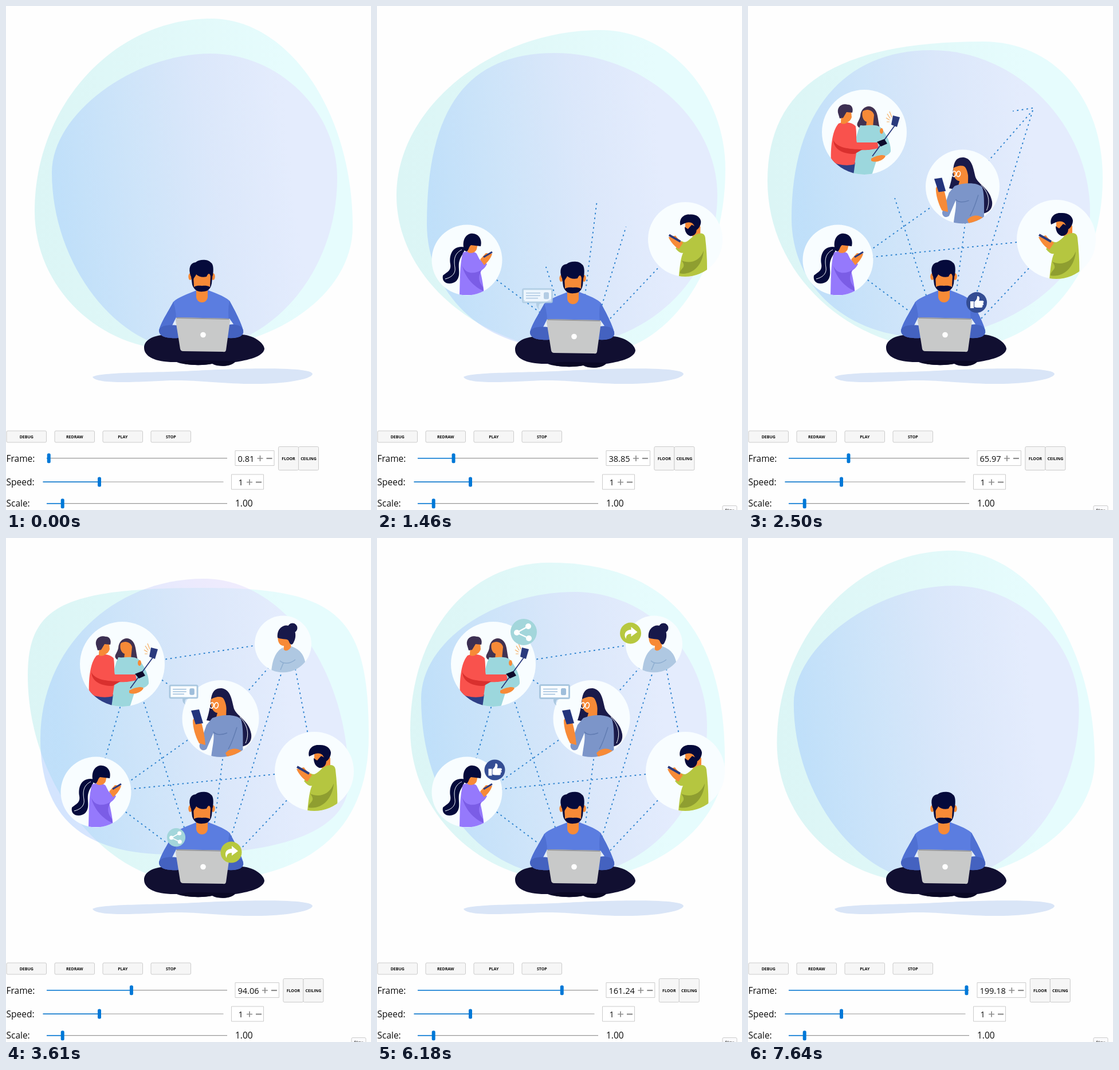
Animation, 637 px wide and 879 px high, one loop 7690 ms. Source, as an HTML page with a canvas:

```html
<!DOCTYPE html>
<html lang="en">
<head>
<meta charset="utf-8">
<title>Connected people</title>
<style>
html, body { margin: 0; width: 100%; height: 100%; overflow: hidden; background: #fefefe; }
canvas { display: block; }
</style>
</head>
<body>
<canvas id="stage" width="637" height="879"></canvas>
<script>
const ctx = document.getElementById('stage').getContext('2d');
const LOOP = 7690;
const SKIN = '#f78a37', DARK = '#050a3b', PHONE = '#2a3a7d', BLUE = '#0078d7';
const FONT = '"Open Sans", "Noto Sans", sans-serif';

// Counter value at given times
const TIMES = [0, 1460, 2500, 3610, 4960, 6180, 7640];
const COUNTS = [0.81, 38.85, 65.97, 94.06, 129.24, 161.24, 199.18];

// Blob poses: left, top, right, bottom node, then the fullness of each corner
const OUTER = [
  [50, 358, 358, 22, 605, 385, 300, 600, 0.55, 0.55, 0.55, 0.55],
  [34, 330, 390, 42, 608, 285, 380, 606, 0.53, 0.55, 0.55, 0.55],
  [34, 305, 410, 62, 619, 300, 350, 600, 0.68, 0.59, 0.58, 0.55],
  [38, 240, 350, 87, 633, 345, 320, 600, 0.8, 0.81, 0.66, 0.52],
  [53, 300, 245, 63, 615, 350, 330, 598, 0.62, 0.75, 0.58, 0.56],
  [58, 335, 300, 43, 607, 385, 330, 598, 0.58, 0.66, 0.55, 0.55]
];
const INNER = [
  [80, 290, 357, 83, 578, 300, 320, 600, 0.49, 0.54, 0.55, 0.52],
  [87, 380, 310, 82, 594, 330, 310, 595, 0.68, 0.54, 0.56, 0.56],
  [76, 370, 320, 77, 597, 360, 310, 578, 0.63, 0.54, 0.5, 0.58],
  [60, 350, 345, 71, 598, 425, 290, 552, 0.56, 0.55, 0.65, 0.68],
  [71, 335, 345, 85, 600, 390, 320, 562, 0.58, 0.55, 0.57, 0.68],
  [77, 280, 345, 94, 576, 330, 330, 590, 0.53, 0.55, 0.55, 0.58]
];

const clamp = x => Math.max(0, Math.min(1, x));
const span = (f, a, b) => clamp((f - a) / (b - a));
const easeOut = p => 1 - (1 - p) ** 3;
const leave = f => 1 - span(f, 184, 197) ** 2;

function fill(color, d) {
  ctx.fillStyle = color;
  ctx.fill(new Path2D(d));
}
function stroke(color, width, d) {
  ctx.strokeStyle = color;
  ctx.lineWidth = width;
  ctx.stroke(new Path2D(d));
}
function oval(color, x, y, rx, ry = rx) {
  ctx.fillStyle = color;
  ctx.beginPath();
  ctx.ellipse(x, y, rx, ry, 0, 0, 7);
  ctx.fill();
}
function scaled(x, y, s, draw) {
  ctx.save();
  ctx.translate(x, y);
  ctx.scale(s, s);
  draw();
  ctx.restore();
}

// ---- background ----
// Smooth cyclic interpolation of a list of poses
function poseAt(keys, f) {
  const n = keys.length;
  const time = i => 200 * Math.floor(i / n) + COUNTS[(i + n) % n];
  let i = n - 1;
  while (i > 0 && f < COUNTS[i]) i--;
  const h = time(i + 1) - time(i);
  const p = clamp((f - time(i)) / h), q = 1 - p;
  return keys[i].map((_, k) => {
    const at = j => keys[(j + n) % n][k];
    const slope = j => (at(j + 1) - at(j - 1)) / (time(j + 1) - time(j - 1));
    return at(i) * (1 + 2 * p) * q * q + slope(i) * h * p * q * q
      + at(i + 1) * p * p * (3 - 2 * p) - slope(i + 1) * h * p * p * q;
  });
}
function blob(keys, f, color) {
  const [lx, ly, tx, ty, rx, ry, bx, by, a, b, c, d] = poseAt(keys, f);
  ctx.beginPath();
  ctx.moveTo(lx, ly);
  ctx.bezierCurveTo(lx, ly + (ty - ly) * a, tx + (lx - tx) * a, ty, tx, ty);
  ctx.bezierCurveTo(tx + (rx - tx) * b, ty, rx, ry + (ty - ry) * b, rx, ry);
  ctx.bezierCurveTo(rx, ry + (by - ry) * c, bx + (rx - bx) * c, by, bx, by);
  ctx.bezierCurveTo(bx + (lx - bx) * d, by, lx, ly + (by - ly) * d, lx, ly);
  ctx.fillStyle = color;
  ctx.fill();
}
function gradient(x0, y0, x1, y1, ...colors) {
  const g = ctx.createLinearGradient(x0, y0, x1, y1);
  colors.forEach((c, i) => g.addColorStop(i / (colors.length - 1), c));
  return g;
}
const outerFill = gradient(40, 330, 500, 300, '#dbf5f5', '#e0f8f8', '#e6fcfd');
const innerFill = gradient(95, 365, 500, 305, '#95beff66', '#b3c7fc66', '#d0ccfb66', '#e1d4fd66');

// ---- dotted links: x0, y0, x1, y1, start, end ----
const LINKS = [
  [285, 535, 157, 439, 8, 22], [407, 545, 538, 407, 14, 32],
  [363, 505, 387, 315, 15, 42.3], [390, 530, 497, 182, 20, 65.2],
  [311, 505, 219, 220, 27.5, 92], [157, 466, 374, 312, 40, 55],
  [157, 444, 538, 405, 42, 62], [374, 322, 497, 182, 48, 66],
  [497, 178, 203, 223, 63, 88], [203, 200, 374, 318, 72, 90],
  [497, 187, 538, 400, 70, 88], [218, 230, 157, 440, 72, 90]
];
function links(f) {
  ctx.save();
  ctx.globalAlpha = 1 - span(f, 184, 192);
  ctx.setLineDash([2.8, 5.6]);
  for (const [x0, y0, x1, y1, a, b] of LINKS) {
    const p = span(f, a, b);
    if (p) stroke('#2c82cf', 1.9, `M${x0} ${y0}L${x0 + (x1 - x0) * p} ${y0 + (y1 - y0) * p}`);
  }
  ctx.restore();
}

// ---- people in circles ----
function girl() {
  fill(DARK, 'M154 421C134 416 125 432 128 450C130 462 122 464 115 470C112 484 128 488 138 480C148 470 140 456 144 444C147 434 152 432 154 421Z');
  stroke('#f4fbff', 1, 'M148 425C134 432 134 444 136 456C138 468 128 474 119 476');
  fill('#9579fc', 'M150 430C160 426 170 428 174 432C178 440 180 446 183 443L192 450C188 458 184 460 180 462C184 478 186 490 187 504L144 504C145 480 144 450 150 430Z');
  fill('#7b5de6', 'M149 453C155 468 170 468 183 460C178 468 175 478 185 490L186 497C168 490 152 470 149 453Z');
  fill(SKIN, 'M158 414L158 429C164 433 172 430 174 424L176 414Z');
  fill(DARK, 'M151 420C149 405 158 395 168 397C178 398 184 408 181 419L164 417C160 420 160 426 157 428C152 428 151 424 151 420Z');
  fill(SKIN, 'M180 442L190 431L201 432C199 440 192 448 187 452Z');
  stroke(PHONE, 3, 'M186 438L201 429');
}
function reader() {
  fill(SKIN, 'M538 374L560 374L566 384L566 402C556 408 540 396 538 388Z');
  fill('#b5c640', 'M554 400C564 394 574 394 575 404C578 430 579 455 578 477L526 477C528 455 530 440 534 432C528 434 522 426 520 424L531 410C540 416 545 407 554 400Z');
  fill('#8f9e30', 'M572 428C564 450 544 452 531 446C542 460 528 460 528 470C550 474 570 456 572 428Z');
  fill(SKIN, 'M507 403L520 400C524 406 530 411 534 413L526 425C518 420 511 412 507 403Z');
  stroke(PHONE, 4, 'M508 399L529 411');
  fill(DARK, 'M537 384L543 388L550 380L558 384C561 394 556 401 547 401C540 398 537 392 537 384Z');
  fill(DARK, 'M529 381C526 370 534 360 546 361C558 360 566 366 567 374C567 382 562 388 558 390L556 384L552 378C544 372 536 378 529 381Z');
}
function couple() {
  fill('#413251', 'M196 192C197 176 212 170 221 180C228 188 226 202 231 216L194 212C186 206 194 202 196 192Z');
  fill(SKIN, 'M200 184C208 178 218 182 220 190L218 210L206 210L207 202C201 200 198 192 200 184Z');
  fill('#9cd7dd', 'M196 208C206 210 222 204 232 212C240 222 250 238 249 254C245 262 232 264 226 264L216 295L182 295C182 262 186 230 196 208Z');
  oval(SKIN, 233, 218, 3, 5);
  fill(SKIN, 'M215 266C225 260 238 258 240 262C236 270 222 274 215 270Z');
  fill('#2e3f86', 'M146 268L187 273L184 295L160 295Z');
  fill('#f9524d', 'M158 205C170 200 184 204 188 210C190 225 188 232 190 238L226 238L228 248C210 252 200 252 190 250L186 276C170 280 156 276 145 272C144 250 146 218 158 205Z');
  fill('#d9302e', 'M149 234C155 247 175 250 200 250L186 258C165 258 150 250 149 234Z');
  fill(SKIN, 'M163 183L180 183L181 194C178 202 174 202 172 204C168 206 164 206 162 204Z');
  fill('#3c2f52', 'M157 186C155 174 166 169 174 172C182 172 184 180 182 186L172 185L166 195L160 196Z');
  stroke(PHONE, 1.8, 'M217 262L258 206');
  fill('#0d0b2c', 'M225 237L238 232L243 240L232 245Z');
  fill(PHONE, 'M253 191L265 194L260 211L250 207Z');
  stroke('#f6ad62', 1.2, 'M251 194L247 184M248 196L243 188M247 199L241 195M247 202L242 202');
}
function glasses() {
  fill('#1a1a49', 'M350 318C356 300 356 290 358 280C360 266 366 262 376 262C392 264 394 282 398 298C404 312 424 318 428 342C430 358 418 364 408 364L372 322Z');
  stroke('#f4fbff', 1, 'M408 312C420 324 426 340 418 358');
  fill(SKIN, 'M358 281C366 274 382 276 385 286L384 316L366 316L369 305C360 304 356 292 358 281Z');
  fill('#7c95c9', 'M360 314C375 308 400 306 410 316C416 335 412 360 414 383L358 383C360 364 364 350 362 340L350 368C342 374 336 366 338 360L350 326Z');
  stroke('#617cb2', 1.5, 'M362 338C366 344 376 344 386 340M403 330C398 346 394 358 388 368');
  fill(SKIN, 'M326 318C328 310 338 316 341 322C345 335 347 350 348 361L337 358C330 345 326 330 326 318Z');
  fill(SKIN, 'M383 375C392 365 404 366 412 372L404 382L386 382Z');
  fill('#23347c', 'M323 301L337 299L344 323L331 325Z');
  fill('#1a1a49', 'M358 281C360 266 374 262 384 268C392 276 390 290 386 304C384 290 382 280 376 277C370 276 364 278 358 281Z');
  ctx.strokeStyle = '#fff';
  ctx.lineWidth = 1.6;
  for (const x of [359, 367]) {
    ctx.beginPath();
    ctx.ellipse(x, 292, 3.4, 5, 0.2, 0, 7);
    ctx.stroke();
  }
}
function bun() {
  oval('#17184a', 500, 157, 8.5);
  fill(SKIN, 'M475 168L494 168L498 192C494 202 484 202 484 196L485 188C476 188 473 178 475 168Z');
  fill('#17184a', 'M474 174C472 158 484 150 494 153C506 156 508 172 502 182C500 187 496 187 494 181C492 174 484 178 474 174Z');
  fill('#afc8e2', 'M483 191C486 200 494 197 498 189C512 194 520 202 523 220L520 236L463 236C464 215 470 198 483 191Z');
  stroke('#8dadd0', 1.5, 'M478 214C484 220 496 220 505 212M479 230L484 218');
}
// centre, radius, start, figure
const CIRCLES = [
  [157, 443, 61.5, 12, girl], [538, 407, 69, 27.8, reader],
  [203, 220, 74, 40, couple], [374.5, 315, 67, 54, glasses],
  [483.5, 185, 49.5, 72, bun]
];
function circle([x, y, r, start, figure], f) {
  const s = easeOut(span(f, start, start + 18)) * leave(f);
  if (s <= 0) return;
  scaled(x, y, s, () => {
    oval('#f8fdff', 0, 0, r);
    ctx.clip();
    ctx.translate(-x, -y);
    figure();
  });
}

// ---- icons, drawn around the origin ----
function bubble() {
  fill('#a9c7df', 'M-2 12L14 12L4 14Q1 18 3 24Q-3 20 -2 12Z');
  ctx.beginPath();
  ctx.roundRect(-25.5, -11.5, 51, 23, 2);
  ctx.fillStyle = '#f9fdff';
  ctx.fill();
  ctx.strokeStyle = '#a9c7df';
  ctx.lineWidth = 3;
  ctx.stroke();
  stroke('#9fbedb', 1.7, 'M-20 -4.5H5M-20 0H5M-20 4.5H1');
  ctx.beginPath();
  ctx.roundRect(11, -6, 9, 12, 2.5);
  ctx.fillStyle = '#9fbedb';
  ctx.fill();
}
function thumb() {
  oval('#344d94', 0, 0, 18);
  fill('#fff', 'M-11 -2H-5V10H-11ZM-4 -1C0 -4 1 -7 1 -11C5 -12 6 -7 4 -3H11C13 -2 13 0 11 1C13 3 12 5 10 5C11 7 10 9 8 9H0L-4 8Z');
}
function share() {
  oval('#a3d6db', 0, 0, 23);
  stroke('#fff', 2.4, 'M8 -10L-12 1L9 11');
  oval('#fff', 8, -10, 5);
  oval('#fff', -12, 1, 5);
  oval('#fff', 9, 11, 5);
}
function arrow() {
  oval('#b7c83f', 0, 0, 18.5);
  fill('#fff', 'M1 -11L12 -2L1 6V1C-5 1 -8 4 -8 10C-13 1 -8 -6 1 -6Z');
}
const BADGES = [
  [310, 268, 86.7, bubble], [205.5, 404.5, 98, thumb],
  [256, 164, 110, share], [442.5, 166, 121.6, arrow]
];
const FLOATS = [
  [280, 16.9, 1, bubble], [399, 48.8, 1, thumb], [297, 78.9, 0.7, share],
  [393, 89.3, 1, arrow], [392, 110, 1, arrow]
];
function badges(f) {
  for (const [x, y, start, icon] of BADGES) {
    const s = easeOut(span(f, start, start + 12)) * leave(f);
    if (s > 0) scaled(x, y, s, icon);
  }
}
function floats(f) {
  for (const [x, start, size, icon] of FLOATS) {
    const age = f - start;
    if (age <= 0 || age >= 34) continue;
    ctx.globalAlpha = 1 - span(age, 18, 34);
    scaled(x, 560 - age * 2.5, size * easeOut(span(age, 0, 5)), icon);
    ctx.globalAlpha = 1;
  }
}

// ---- sitting man ----
function sitter(f) {
  ctx.save();
  ctx.translate(0, 3 * Math.sin(Math.PI * span(f, 12, 65.7)) ** 2);
  fill('#110f31', 'M241 596C241 582 258 572 290 573L400 573C430 570 451 588 451 598C449 612 420 618 400 621C392 629 370 630 360 624C340 628 310 626 298 621C262 622 241 612 241 596Z');
  fill('#0a0825', 'M302 621C320 615 350 619 399 619C397 628 372 631 362 623C345 628 315 627 302 621Z');
  fill('#5b7de0', 'M332 496C318 502 300 508 292 516C285 530 270 552 267 566C267 578 285 580 300 579L388 579C405 580 415 576 414 566C410 550 396 525 390 514C380 505 362 500 352 495Z');
  fill('#4f70d2', 'M292 516C285 530 270 552 267 566L296 558Q299 536 292 516ZM390 514C396 525 410 550 414 566L390 557Q386 532 390 514Z');
  fill('#e2edfb', 'M297 543L290 557L299 558ZM390 545L388 556L397 555Z');
  fill('#4462c0', 'M267 566C270 556 285 556 298 557L301 579C285 580 267 578 267 566ZM414 566C412 556 400 555 389 556L386 579C405 580 416 576 414 566Z');
  fill(SKIN, 'M332 492V508C334 520 350 520 352 508V492Z');
  oval(SKIN, 321.5, 472, 3.2, 6);
  oval(SKIN, 361.5, 472, 3.2, 6);
  fill(SKIN, 'M325 462L325 482C327 494 334 498 342 498C350 498 356 494 358 480L358 462Z');
  fill(DARK, 'M322 464L325 486C328 496 336 499 343 498C352 498 357 494 359 484L361 464L357 470L356 490C350 487 346 488 342 488C338 488 333 487 328 490L327 470Z');
  fill(DARK, 'M322 470C318 458 321 448 331 447C338 441 353 442 357 447C363 450 362 462 361 470L357 472C356 466 353 465 350 472C343 474 336 472 332 468C330 473 327 474 327 478Z');
  fill('#c8c9c9', 'M300 543L387 545Q391 545 391 549L384 600Q383 604 379 603L309 602Q305 602 304 598L296 548Q296 543 300 543Z');
  stroke('#98999d', 2.2, 'M298 544L389 546');
  oval('#fff', 344, 573.5, 4.8);
  ctx.restore();
}

// ---- controls ----
function box(x, y, w, h, color, r = 2) {
  ctx.beginPath();
  ctx.roundRect(x + 0.5, y + 0.5, w, h, r);
  ctx.fillStyle = color;
  ctx.fill();
  ctx.strokeStyle = '#cbcbcb';
  ctx.lineWidth = 1;
  ctx.stroke();
}
function text(s, x, y, size, align = 'left', weight = 400) {
  ctx.font = `${weight} ${size}px ${FONT}`;
  ctx.textAlign = align;
  ctx.fillStyle = '#0c0c0c';
  ctx.fillText(s, x, y);
}
function button(label, x, y, w, h) {
  box(x, y, w, h, '#f6f6f6');
  text(label, x + w / 2 + 0.5, y + h / 2 + 3, 7, 'center', 700);
}
function slider(x, y, knob) {
  stroke('#989898', 1.2, `M${x} ${y}H${x + 315}`);
  stroke(BLUE, 1.6, `M${x} ${y}H${knob}`);
  ctx.beginPath();
  ctx.roundRect(knob - 3, y - 8.5, 6, 17, 2.5);
  ctx.fillStyle = BLUE;
  ctx.fill();
}
function spinner(value, x, y, w, tx) {
  box(x, y, w, 26, '#fff', 0);
  text(value, tx, y + 19.5, 14.5);
  const end = x + w, mid = y + 14;
  stroke('#8c8c8c', 1.7, `M${end - 29} ${mid}h10m-5 -5v10`);
  stroke('#8c8c8c', 2.2, `M${end - 13} ${mid}h10`);
}
function controls(f, t) {
  ['DEBUG', 'REDRAW', 'PLAY', 'STOP'].forEach((s, i) => button(s, 84 * i + 0.5, 740.5, 69.5, 20));
  text('Frame:', 0.5, 795, 15.5);
  text('Speed:', 0.5, 836, 15.5);
  text('Scale:', 0.5, 873, 15.5);
  slider(71, 788.7, 73.5 + f * 1.546);
  slider(64.5, 830, 163);
  slider(71, 867.7, 98.7);
  const value = f.toFixed(2), dx = 8.4 * (value.length - 4);
  spinner(value, 399.5, 775, 68 + dx, 404.5);
  button('FLOOR', 475 + dx, 768, 35, 41);
  button('CEILING', 510 + dx, 768, 35, 41);
  spinner('1', 393, 816.5, 56, 405.5);
  text('1.00', 400, 873, 15.5);
  if (t >= 400) {
    box(602.5, 871, 25, 14, '#fbfbfd');
    text('Play', 615, 882, 8, 'center');
  }
}

function render(time) {
  let i = TIMES.length - 1;
  while (time < TIMES[i]) i--;
  const t = TIMES[i] + Math.floor((time - TIMES[i]) / 40) * 40;
  const f = i === TIMES.length - 1 ? COUNTS[i]
    : COUNTS[i] + (COUNTS[i + 1] - COUNTS[i]) * (t - TIMES[i]) / (TIMES[i + 1] - TIMES[i]);

  ctx.fillStyle = '#fefefe';
  ctx.fillRect(0, 0, 637, 879);
  blob(OUTER, f, outerFill);
  blob(INNER, f, innerFill);
  fill('#d9e5f7', 'M151 647C165 638 260 640 330 636C400 632 535 628 535 642C532 652 480 660 425 659C370 658 330 652 290 653C250 654 160 662 151 647Z');
  links(f);
  CIRCLES.forEach(c => circle(c, f));
  badges(f);
  sitter(f);
  floats(f);
  controls(f, t);
}

let origin;
function tick(now) {
  origin ??= now;
  render((now - origin) % LOOP);
  requestAnimationFrame(tick);
}
requestAnimationFrame(tick);
</script>
</body>
</html>
```
